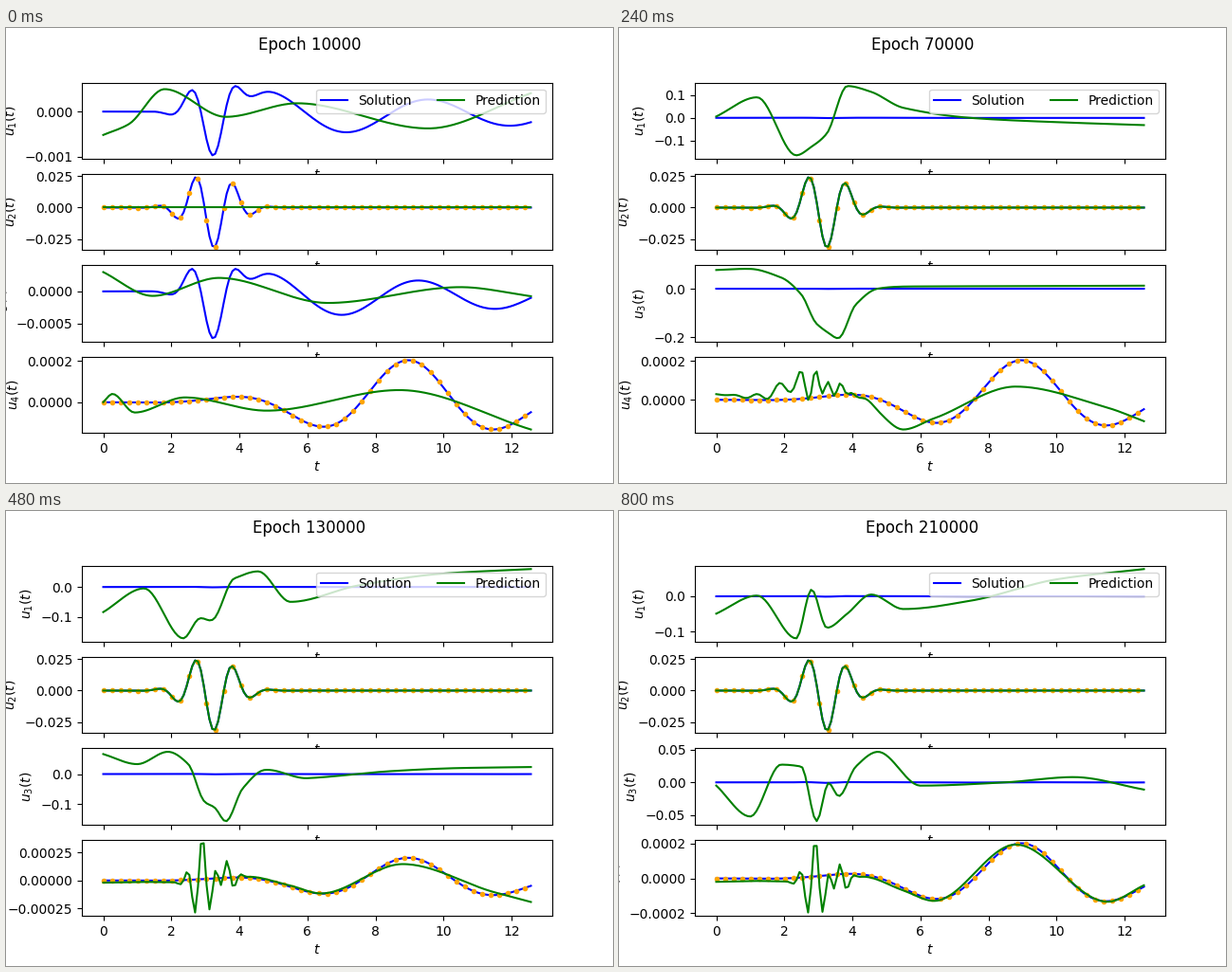
Animation of 640x480 px, one loop 840 ms. Source, as a matplotlib script:

```python
import numpy as np
import matplotlib.pyplot as plt
from matplotlib.animation import FuncAnimation

T = np.linspace(0, 4 * np.pi, 150)
END = T[-1]


def pulse(centre, width, omega, peak=None):
    """Oscillation under a Gaussian envelope."""
    peak = centre if peak is None else peak
    return np.exp(-((T - centre) / width) ** 2) * np.cos(omega * (T - peak))


def swing(amp, decay, period, offset):
    """Damped oscillation that sets in after the pulse."""
    tau = T - 4.8
    onset = 1 / (1 + np.exp(-(T - 3.4) / .15))
    wave = amp * np.exp(-decay * tau) * np.cos(2 * np.pi / period * tau)
    return onset * (wave + offset)


def through(x, y):
    """Smooth curve that turns only at its key points."""
    x, y = np.asarray(x, float), np.asarray(y, float)
    h = np.diff(x)
    d = np.diff(y) / h
    both = d[:-1] * d[1:]
    total = np.where(both > 0, d[:-1] + d[1:], 1)
    m = np.r_[d[0], np.where(both > 0, 2 * both / total, 0), d[-1]]
    k = np.clip(np.searchsorted(x, T, "right") - 1, 0, len(h) - 1)
    s = (T - x[k]) / h[k]
    return (y[k] + (y[k + 1] - y[k]) * s * s * (3 - 2 * s)
            + h[k] * s * (1 - s) * (m[k] * (1 - s) - m[k + 1] * s))


kick = -pulse(3.2, .8, 4.5, 3.22)
solution = [
    2.2e-5 * (41 * kick + swing(23, .093, 4.8, -2.5)),
    -.0319 * pulse(3.177, .888, 5.55, 3.26),
    1.61e-5 * (41 * kick + swing(22, .085, 4.5, -4.5)),
    2.03e-4 * pulse(9.1, 3.77, 1.14, 8.95),
]

# Predictions at a few stages of training, as heights at shared times.
stages = [0, 4, 8, 10, 16, 20]

x1 = [0, 1.2, 2.35, 2.8, 3.25, 3.85, 4.55, 5.5, 7.5, 10, END]
u1 = [1e-3 * through([0, .75, 1.8, 3.6, 5.7, 9.55, END],
                     [-.52, -.28, .5, -.117, .185, -.375, .41])]
u1 += [.01 * through(x1, y) for y in (
    [4.6, 12.8, -14.3, -11, -4.7, 13.4, 11.4, 4.8, -1, -3.3, -4.5],
    [-3.4, 5.3, -18.7, -14.4, -9, 14.6, 11.5, 4, .9, -.5, -1.9],
    [-8, .2, -18.9, -14.5, -9.8, 7.4, 8.1, -4.5, .5, 3.5, 5],
    [-9, -1.8, -13.4, -2.8, -12.2, -6.2, -.6, -5.8, .6, 6.4, 7.9],
    [-4.9, .2, -11.9, 1.9, -8.9, -4.9, .5, -3.6, -1.2, 4.8, 7.7])]

x3 = [0, 1, 1.9, 2.5, 2.95, 3.3, 3.6, 4.1, 4.75, 6, 8.5, 10.5, END]
u3 = [1e-3 * through([0, 1.45, 3.4, 6.6, 10.5, END],
                     [.3, -.07, .21, -.18, .066, -.075])]
u3 += [.01 * through(x3, y) for y in (
    [4.2, 6.5, 0, -8.3, -18.9, -18.4, -17.2, -2, 2.9, 1.2, -.2, -.6, -.9],
    [11.2, 9.8, 9.3, 3.5, -10, -18, -23.4, -11, -2.8, .7, 2.3, 2.9, 3.4],
    [8.5, 5.2, 8.3, 3.4, -10, -15.5, -21.4, -9, -1.2, -.3, 2, 2.9, 3.5],
    [2.9, -.5, 5.6, 3, -6.5, -3.3, -4.3, 3.8, 6.5, -3.5, -1, .2, 0],
    [-.5, -5.2, 2.7, 2.4, -5.9, -.1, -2.1, 2.4, 4.65, -.5, 0, .8, -1.1])]

x4 = [0, 1.2, 2.4, 3.3, 4.3, 5.5, 6.4, 8.8, 11.5, END]
u4 = [1e-4 * through([0, .27, .92, 2.4, 4.8, 8.7, END],
                     [0, .4, -.5, .23, -.41, .585, -1.32])]
u4 += [1e-4 * through(x4, y) for y in (
    [-.2, 0, 0, 0, .6, -1.05, -.45, .35, -.22, -.55],
    [.77, .3, 1.7, 1.3, -.4, -2, -1.46, 1, -.6, -1.65],
    [-.3, -.2, -.3, 0, .3, -.4, -1.15, 1.46, -.85, -1.9],
    [0, 0, .1, .6, .4, -.6, -1.2, 1.47, -1.5, -2],
    [-.2, -.15, -.2, -.2, .1, -.7, -1.3, 1.95, -1.35, -.4])]

u2 = [0 * T] + [solution[1]] * 5
states = [u1, u2, u3, u4]

# Ringing of the fourth component: broad at first, then a sharp burst.
broad = 8e-5 * pulse(2.5, 1.3, 9.5)
burst = 1e-4 * (pulse(2.91, .38, 13.6) + .4 * pulse(3.63, .3, 14))


def ringing(i):
    return (broad * np.interp(i, [0, 4, 8], [0, 1, 0])
            + burst * np.interp(i, [4, 8, 10, 14, 16, 20],
                                [0, 2, 2.9, 5, 4.4, 2.5]))


fig, axes = plt.subplots(4, 1, sharex=True, figsize=(6.4, 4.8), dpi=100)
title = fig.suptitle("", y=.982)
lines = []
for n, (ax, sol) in enumerate(zip(axes, solution), 1):
    ax.plot(T, sol, "b", label="Solution")
    if n in (2, 4):
        ax.plot(T[::3], sol[::3], ".", color="orange")
    lines += ax.plot(T, 0 * T, "g", label="Prediction")
    ax.set_xlabel("$t$")
    ax.set_ylabel(f"$u_{n}(t)$")
axes[0].legend(loc="upper right", ncol=2)


def update(i):
    k = min(np.searchsorted(stages, i, "right") - 1, len(stages) - 2)
    p = (i - stages[k]) / (stages[k + 1] - stages[k])
    if k == 0:
        p = 1 - (1 - p) ** 2  # fast early learning
    for n, (ax, line, keys) in enumerate(zip(axes, lines, states), 1):
        y = (1 - p) * keys[k] + p * keys[k + 1]
        line.set_ydata(y + ringing(i) if n == 4 else y)
        ax.relim()
        ax.autoscale_view()
    title.set_text(f"Epoch {(i + 1) * 10000}")
    return lines


anim = FuncAnimation(fig, update, frames=21, init_func=lambda: update(0),
                     interval=40, repeat=True, repeat_delay=0)
plt.show()
```
